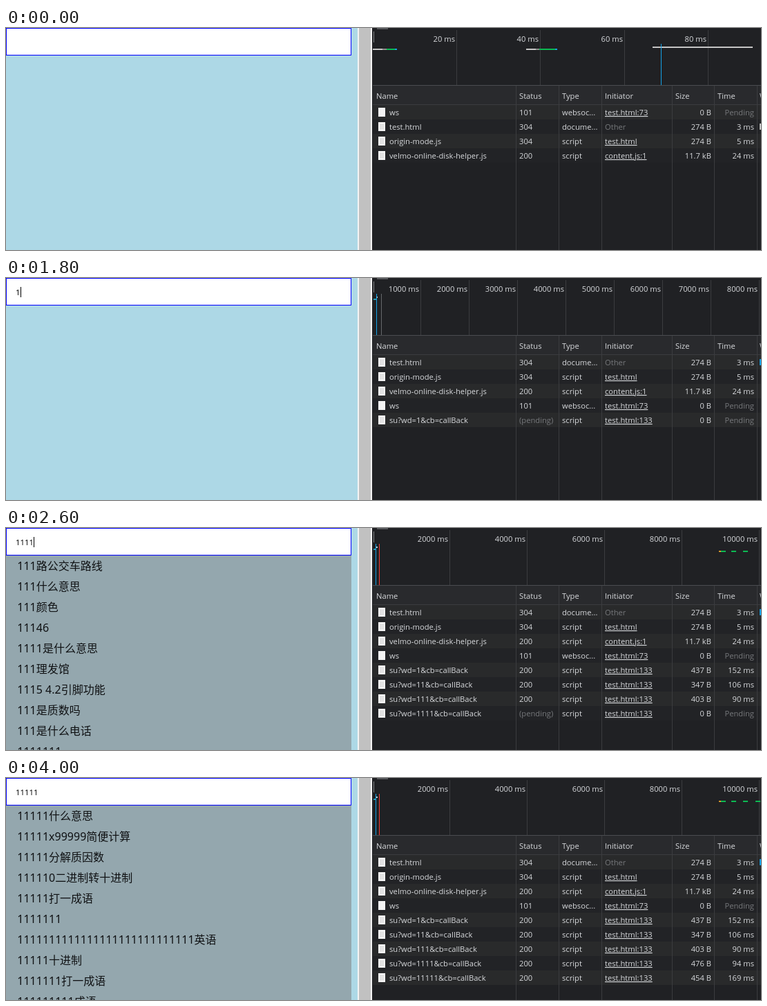
Write an HTML page that moves like this. It is 1093 px wide and 323 px high and loops after 4100 ms.

```html
<!DOCTYPE html>
<html lang="zh">
<head>
<meta charset="utf-8">
<style>
  html, body { margin: 0; width: 100%; height: 100%; overflow: hidden; background: #add8e6; }
  svg { display: block; width: 1093px; height: 323px; }
  rect { shape-rendering: crispEdges; }
  text { font: 11.2px "Open Sans", "Noto Sans", sans-serif; fill: #d7d9dc; white-space: pre; }
  .dim { fill: #77797c; }
  .link { text-decoration: underline; }
  .end { text-anchor: end; }
  .typed { font-size: 11.4px; fill: #000; }
  .hint { font: 16px "Noto Sans", "Noto Sans CJK SC", "Noto Sans CJK", sans-serif; fill: #101214; }
</style>
</head>
<body>
<svg id="stage" viewBox="0 0 1093 323"></svg>
<script>
const LOOP = 4100;
const LIGHT = '#c6c6c6', GREY = '#8d8d8d', GREEN = '#0cba52', BLUE = '#13a2e8', LINE = '#3b3c3f';

// time, typed digits, caret, requests sent, requests answered
const steps = [
  [0, 0, 0, 0, 0], [1200, 0, 1, 0, 0],
  [1600, 1, 1, 0, 0], [1700, 1, 1, 1, 0], [1900, 2, 1, 1, 1],
  [2000, 2, 1, 2, 1], [2100, 2, 1, 2, 2],
  [2200, 3, 1, 2, 2], [2300, 3, 1, 3, 2], [2400, 3, 1, 3, 3],
  [2500, 4, 1, 3, 3], [2600, 4, 1, 4, 3], [2700, 4, 1, 4, 4],
  [2800, 5, 1, 4, 4], [2900, 5, 1, 5, 4], [3100, 5, 1, 5, 5],
  [3300, 5, 0, 5, 5], [3800, 5, 1, 5, 5], [4000, 5, 0, 5, 5]
];

const ones = n => '1'.repeat(n);
const hints = [
  [],
  ['1升等于多少毫升', '1kg等于多少斤', '1公顷等于多少平方米', '1吨等于多少千克', '1美元等于多少人民币',
    '40927官网', '1米等于多少厘米', '174 邮箱', '190.2471.1', '1公顷等于多少平方千米'],
  ['11是质数吗', '11月有多少天', '11的倍数', '11点是什么时辰', '11路公交车路线',
    '11寸等于多少厘米', '11月是什么星座', '11的平方', '11英里等于多少', '11是什么意思'],
  ['111路公交车路线', '111什么意思', '111颜色', '11146', '1111是什么意思',
    '111理发馆', '1115 4.2引脚功能', '111是质数吗', '111是什么电话', ones(7)],
  ['1111', '1111是什么意思', '1111打一成语是什么', '1111是什么星座', '111111是什么意思网络',
    '1111等于0 1868等于几', '1111x37+9999x7简便计算', '1111克是多少斤', '1111111转化为十进制', ones(36)],
  ['11111什么意思', '11111x99999简便计算', '11111分解质因数', '111110二进制转十进制', '11111打一成语',
    ones(7), ones(28) + '英语', '11111十进制', '1111111打一成语', '111111111成语']
];

const socket = ['ws', '101', 'websoc...', 'test.html:73', '0 B', 'Pending'];
const files = [
  ['test.html', '304', 'docume...', 'Other', '274 B', '3 ms'],
  ['origin-mode.js', '304', 'script', 'test.html', '274 B', '5 ms'],
  ['velmo-online-disk-helper.js', '200', 'script', 'content.js:1', '11.7 kB', '24 ms']
];
const replies = [['437 B', '152 ms'], ['347 B', '106 ms'], ['403 B', '90 ms'], ['476 B', '94 ms'], ['454 B', '169 ms']];

const rect = (x, y, w, h, fill) => `<rect x="${x}" y="${y}" width="${w}" height="${h}" fill="${fill}"/>`;
const text = (x, y, value, kind = '') =>
  `<text x="${x}" y="${y}" class="${kind}">${value.replace(/&/g, '&amp;')}</text>`;

function page(typed, caret, answered) {
  let out = rect(0, 0, 510, 323, '#add8e6');
  if (answered) out += rect(0, 40, 500, 283, '#94a7ae');
  hints[answered].forEach((hint, i) => out += text(16.3, 61 + 30 * i, hint, 'hint'));
  out += rect(0, 0, 500, 40, '#0000ff') + rect(1, 1, 498, 38, '#fff') + text(14, 25, ones(typed), 'typed');
  if (caret) out += rect(Math.round(14 + 6.6 * typed), 13, 1, 15, '#000');
  return out + rect(509, 0, 21, 323, '#f4f4f4') + rect(511, 0, 17, 323, '#c1c1c1');
}

function timeline(sent, answered) {
  const [gap, unit] = !sent ? [121.5, 20] : answered && sent > 1 ? [112, 2000] : [70, 1000];
  let out = rect(537, 0, 16, 2, '#55575a') + rect(532, 5, 1, 16, '#85878a');
  for (let i = 1; 530.5 + gap * i < 1093; i++) {
    const x = Math.floor(530.5 + gap * i);
    out += rect(x, 3, 1, 80, LINE) + text(x - 2, 20, `${unit * i} ms`, 'end');
  }
  if (!sent) {
    out += rect(531, 30, 14, 2, LIGHT) + rect(545, 30, 6, 2, GREY) + rect(551, 30, 12, 2, GREEN) + rect(563, 30, 3, 2, BLUE)
      + rect(753, 30, 14, 2, LIGHT) + rect(767, 30, 5, 2, GREY) + rect(772, 30, 23, 2, GREEN) + rect(795, 30, 3, 2, BLUE)
      + rect(936, 27, 145, 2, LIGHT) + rect(948, 23, 1, 60, BLUE);
  } else {
    const wide = gap === 112;
    out += rect(532, 30, 4, 2, '#2a9db0') + rect(536, 27, 2, 2, LIGHT)
      + rect(wide ? 535 : 536, 23, 1, 60, BLUE)
      + rect(wide ? 540 : 543, 23, 1, 60, wide ? '#f33b36' : '#66686b');
    if (wide) {
      for (let i = 0; i < Math.min(answered, 4); i++) {
        out += rect(Math.round(1032 + 17.5 * i), 33, i ? 7 : 10, 2, GREEN);
      }
      out += rect(1032, 33, 3, 2, '#d99a2b');
    }
  }
  return out;
}

function table(sent, answered) {
  const requests = replies.slice(0, sent).map(([size, time], i) => {
    const done = i < answered;
    return [`su?wd=${ones(i + 1)}&cb=callBack`, done ? '200' : '(pending)', 'script', 'test.html:133',
      done ? size : '0 B', done ? time : 'Pending'];
  });
  const rows = sent ? [...files, socket, ...requests] : [socket, ...files];
  const columns = [555, 743, 805, 867, 1021, 1083];
  let out = rect(531, 83, 562, 1, '#4a4c50') + rect(531, 84, 562, 27, '#292a2d') + rect(531, 111, 562, 1, LINE);
  rows.forEach((row, r) => {
    const y = 112 + 21 * r;
    out += rect(531, y, 562, 21, r % 2 ? '#222326' : '#292a2b') + rect(539, y + 4, 10, 13, '#f3f3f3');
    if (row !== socket) {
      for (let k = 0; k < 4; k++) out += rect(541, y + 7 + 2 * k, 6, 1, '#d2d2d2');
    }
    row.forEach((cell, c) => {
      const kind = /pending|Other/i.test(cell) ? 'dim' : c === 3 ? 'link' : '';
      out += text(columns[c], y + 15, cell, kind + (c > 3 ? ' end' : ''));
    });
    if (row === files[0]) out += rect(1091, y + 6, 2, 9, sent ? BLUE : LIGHT);
  });
  for (const x of [738, 800, 862, 964, 1025, 1087]) out += rect(x, 84, 1, 239, LINE);
  ['Name', 'Status', 'Type', 'Initiator', 'Size', 'Time', 'Waterfall'].forEach((title, i) =>
    out += text([536, 743, 805, 867, 969, 1030, 1091][i], 103, title));
  return out;
}

// The hover line crosses the overview from right to left.
function hoverLine(time) {
  if (time < 200 || time >= 600) return '';
  const k = Math.floor((time - 200) / 100);
  return rect(Math.round(923 - 284 * k / 3), 3, 2, 80, 'hsla(220, 95%, 50%, .7)');
}

const stage = document.getElementById('stage');
let shown = '';

function draw(now) {
  const time = now % LOOP;
  const [, typed, caret, sent, answered] = steps.findLast(step => step[0] <= time);
  const hover = hoverLine(time);
  const state = [typed, caret, sent, answered, hover].join();
  if (state !== shown) {
    shown = state;
    stage.innerHTML = page(typed, caret, answered) + rect(530, 0, 563, 323, '#202124')
      + timeline(sent, answered) + table(sent, answered) + hover;
  }
  requestAnimationFrame(draw);
}

const start = performance.now();
draw(0);
requestAnimationFrame(function begin() {
  (function tick() {
    drawAt(performance.now() - start);
    requestAnimationFrame(tick);
  })();
});
function drawAt() {}
</script>
</body>
</html>
```
